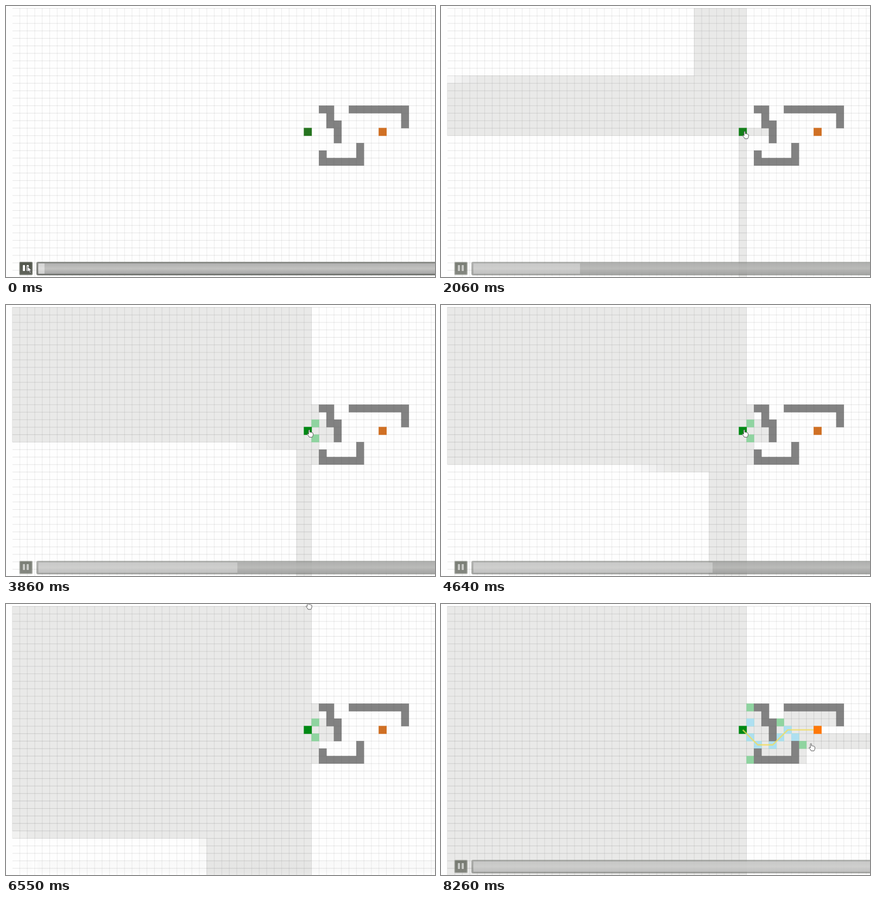
Recreate the animation shown at these times as an HTML page with a canvas. Size 790 px wide and 499 px high, loop 8.34 s.

```html
<!DOCTYPE html>
<html lang="en">
<head>
<meta charset="utf-8">
<title>Jump point search</title>
<style>
html, body { margin: 0; width: 100%; height: 100%; overflow: hidden; background: #fefefe; }
canvas { display: block; width: 790px; height: 499px; }
</style>
</head>
<body>
<canvas id="stage" width="790" height="499"></canvas>
<script>
const ctx = document.getElementById('stage').getContext('2d');
const LOOP = 8340, STEP = 80, RATE = .2016;
const PITCH = 13.777, LEFT = 11.6, TOP = 4.5, COLS = 103, ROWS = 36;
const START = [39, 16], GOAL = [49, 16];
const OPEN = '#8fd4a0', CLOSED = '#aee0f1';

const px = c => LEFT + c * PITCH;
const py = r => TOP + r * PITCH;
const ramp = (t, a, b) => Math.min(1, Math.max(0, (t - a) / (b - a)));
const easeOut = u => 1 - (1 - u) ** 3;
const key = (c, r) => c + ',' + r;

// Each wall is a walk over the cells
const turns = { U: [0, -1], R: [1, 0], D: [0, 1], L: [-1, 0] };
function walk(c, r, route) {
  return [...route].reduce((cells, d) => {
    const [x, y] = cells.at(-1), [dx, dy] = turns[d];
    return [...cells, [x + dx, y + dy]];
  }, [[c, r]]);
}
const walls = [
  ...walk(41, 13, 'RDDRDD'),
  ...walk(45, 13, 'RRRRRRRDD'),
  ...walk(41, 19, 'DRRRRRUU')
];
const blocked = new Set(walls.map(([c, r]) => key(c, r)));
const free = (c, r) => c >= 0 && r >= 0 && c < COLS && r < ROWS && !blocked.has(key(c, r));

// Jump point search that logs every visited cell and every change of a node
const visits = [], marks = [];
const mark = (node, color) => marks.push({ when: visits.length, c: node.c, r: node.r, color });

function forced(c, r, dx, dy) {
  const sides = dx && dy ? [[-dx, 0], [0, -dy]] : [[dy, dx], [-dy, -dx]];
  return sides
    .filter(([x, y]) => !free(c + x, r + y) && free(c + (x || dx), r + (y || dy)))
    .map(([x, y]) => [x || dx, y || dy]);
}

function jump(c, r, dx, dy) {
  for (;;) {
    c += dx;
    r += dy;
    if (!free(c, r)) return null;
    visits.push([c, r]);
    if (key(c, r) === key(...GOAL) || forced(c, r, dx, dy).length) return [c, r];
    if (dx && dy && (jump(c, r, dx, 0) || jump(c, r, 0, dy))) return [c, r];
  }
}

function directions({ c, r, parent }) {
  if (!parent) return [...Object.values(turns), [-1, -1], [1, -1], [1, 1], [-1, 1]];
  const dx = Math.sign(c - parent.c), dy = Math.sign(r - parent.r);
  const natural = dx && dy ? [[0, dy], [dx, 0], [dx, dy]] : [[dx, dy]];
  return [...natural, ...forced(c, r, dx, dy)];
}

function octile(c, r, c2, r2) {
  const x = Math.abs(c - c2), y = Math.abs(r - r2);
  return Math.max(x, y) + (Math.SQRT2 - 1) * Math.min(x, y);
}

function search() {
  const open = [{ c: START[0], r: START[1], g: 0, f: 0 }], best = {};
  while (open.length) {
    const f = Math.min(...open.map(n => n.f));
    const [node] = open.splice(open.findIndex(n => n.f === f), 1);
    if (key(node.c, node.r) === key(...GOAL)) return node;
    mark(node, CLOSED);
    for (const [dx, dy] of directions(node)) {
      const hit = jump(node.c, node.r, dx, dy);
      if (!hit) continue;
      const g = node.g + octile(node.c, node.r, ...hit);
      if (g >= best[key(...hit)] - 1e-6) continue;
      best[key(...hit)] = g;
      const next = { c: hit[0], r: hit[1], g, parent: node };
      next.f = Math.round((g + octile(...hit, ...GOAL)) * 1e6);
      open.push(next);
      mark(next, OPEN);
    }
  }
}
const route = [];
for (let node = search(); node; node = node.parent) route.unshift(node);

function box(c, r, color, grow = .3) {
  ctx.fillStyle = color;
  ctx.fillRect(px(c) - grow, py(r) - grow, PITCH + 2 * grow, PITCH + 2 * grow);
}

function edges(c, r, color) {
  ctx.fillStyle = color;
  ctx.fillRect(px(c) - .5, py(r) - .5, PITCH, 1);
  ctx.fillRect(px(c) - .5, py(r) - .5, 1, PITCH);
}

function drawVisits(n) {
  for (let i = 0; i < Math.min(n, visits.length); i++) {
    ctx.globalAlpha = Math.min(1, (n - i) / 6);
    box(...visits[i], '#e9e9e8');
    edges(...visits[i], 'rgba(0,0,0,.04)');
  }
  ctx.globalAlpha = 1;
}

function drawGrid() {
  ctx.fillStyle = 'rgba(0,0,0,.1)';
  for (let r = 0; r < ROWS; r++) ctx.fillRect(12, py(r) - .5, 778, 1);
  ctx.fillStyle = 'rgba(0,0,0,.08)';
  for (let c = 1; px(c) < 790; c++) ctx.fillRect(px(c) - .5, 4, 1, 495);
}

function drawWalls() {
  for (const cell of walls) {
    box(...cell, '#828282');
    edges(...cell, 'rgba(0,0,0,.06)');
  }
}

function drawRoute() {
  ctx.strokeStyle = 'rgba(243,220,90,.75)';
  ctx.lineWidth = 2.6;
  ctx.lineJoin = 'round';
  ctx.beginPath();
  for (const { c, r } of route) ctx.lineTo(px(c + .5), py(r + .5));
  ctx.stroke();
}

function shade(y, h, ...stops) {
  const g = ctx.createLinearGradient(0, y, 0, y + h);
  stops.forEach((s, i) => g.addColorStop(i / (stops.length - 1), s));
  return g;
}

function panel(x, y, w, h, color, radius) {
  ctx.fillStyle = color;
  ctx.beginPath();
  ctx.roundRect(x, y, w, h, radius);
  ctx.fill();
}

// Controls dim when idle and vanish while the pointer is outside
function drawControls(t) {
  const shown = 1 - ramp(t, 6300, 6480) + ramp(t, 6560, 6850);
  const alpha = (1 - .34 * ramp(t, 1400, 1520)) * shown;
  ctx.globalAlpha = alpha ** 1.3;
  panel(24.5, 471, 24.5, 24.5, '#80837c', 2);
  panel(26, 472.5, 21.5, 21.5, shade(472, 22, '#4f5449', '#62655d'), 1);
  panel(31, 477, 4, 11, '#fff', 1);
  panel(38, 477, 4, 11, '#fff', 1);
  ctx.globalAlpha = alpha;
  panel(56, 471, 760, 25, shade(471, 25, '#8c8e8a', '#757773'), 3);
  panel(59, 474, 760, 19, shade(474, 19, '#b0b0b0', '#c2c2c0', '#a6a6a6'), 1);
  panel(60, 474, 10 + t * .0925, 19, 'rgba(255,255,255,.45)', 0);
  ctx.globalAlpha = 1;
}

const arrow = new Path2D('M0 0V10L2.5 8L4.5 12L6 11.3L4.2 7.4H7.5Z');
const hand = new Path2D('M3.2 8V1.6Q4.3 0 5.4 1.6V5.2Q7 4.5 7.6 5.6Q9 5 9.6 6.2Q11.4 6 11.5 7.6V10.5Q11 12.4 10 14.4H4.6Q3.6 12 .8 9.2Q.8 7 3.2 9Z');

// Pointer moves: begin, end, x, y
const moves = [
  [0, 280, 46, 476], [1200, 2250, 561, 227], [2980, 3300, 554, 229],
  [4650, 5240, 549, 224], [5900, 6120, 549, -10], [6560, 8000, 677, 256]
];

function drawPointer(t) {
  let x = 39, y = 480;
  for (const [a, b, toX, toY] of moves) {
    const u = easeOut(ramp(t, a, b));
    x += (toX - x) * u;
    y += (toY - y) * u;
  }
  const shape = t < 140 ? arrow : hand;
  ctx.save();
  ctx.translate(x, y);
  ctx.fillStyle = '#fff';
  ctx.strokeStyle = '#555';
  ctx.lineWidth = 1;
  ctx.fill(shape);
  ctx.stroke(shape);
  ctx.restore();
}

function draw(t) {
  const n = t * RATE, found = n >= visits.length;
  const fresh = 1 - ramp(t, 0, 4000);
  ctx.fillStyle = '#fefefe';
  ctx.fillRect(0, 0, 790, 499);
  drawVisits(n);
  drawGrid();
  for (const { when, c, r, color } of marks) if (when && when <= n) box(c, r, color);
  drawWalls();
  box(...START, `rgb(${38 * fresh},${137 - 21 * fresh},${20 + 11 * fresh})`, .5);
  if (found) drawRoute();
  box(...GOAL, found ? '#ff7808' : '#d07024', .5);
  drawControls(t);
  drawPointer(t);
}

const begin = performance.now();
function tick() {
  const t = (performance.now() - begin) % LOOP;
  draw(Math.floor((t + 10) / STEP) * STEP + 10);
  requestAnimationFrame(tick);
}
tick();
</script>
</body>
</html>
```
